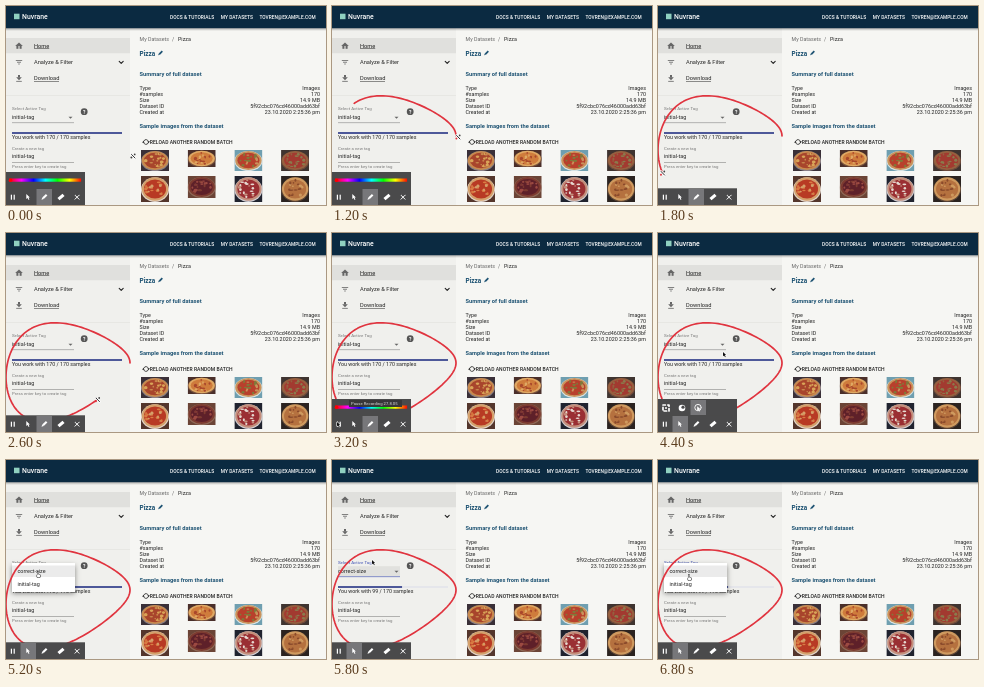
Recreate the animation shown at these times as an HTML page with a canvas. Size 320 by 199 pixels, loop 7 s.

```html
<!DOCTYPE html>
<html lang="en">
<head>
<meta charset="utf-8">
<title>Dataset tags</title>
<style>
html, body { margin: 0; width: 100%; height: 100%; overflow: hidden; background: #f6f6f3; }
canvas { display: block; width: 320px; height: 199px; }
</style>
</head>
<body>
<canvas id="stage"></canvas>
<script>
const W = 320, H = 199, LOOP = 7000, STEP = 200;
const canvas = document.getElementById('stage');
const ctx = canvas.getContext('2d');
const ratio = window.devicePixelRatio || 1;
canvas.width = W * ratio;
canvas.height = H * ratio;

const NAVY = '#0b2a41', TEAL = '#1d5272', INK = '#222', GREY = '#777';
const BLUE = '#3f51b5', RED = '#e0343f', BAR = '#4a4a4b', LIT = '#77777a';

function rect(x, y, w, h, fill) {
  ctx.fillStyle = fill;
  ctx.fillRect(x, y, w, h);
}

// Large type scaled down keeps letter advances exact at small sizes.
function text(str, x, y, size, color = INK, weight = 400, align = 'left') {
  ctx.save();
  ctx.translate(x, y);
  ctx.scale(0.1, 0.1);
  ctx.font = `${weight} ${size * 10}px Roboto, sans-serif`;
  ctx.textAlign = align;
  ctx.fillStyle = color;
  ctx.fillText(str, 0, 0);
  ctx.restore();
}

function line(points, color, width = 1) {
  ctx.beginPath();
  points.forEach(([x, y]) => ctx.lineTo(x, y));
  ctx.strokeStyle = color;
  ctx.lineWidth = width;
  ctx.lineCap = ctx.lineJoin = 'round';
  ctx.stroke();
}

function oval(x, y, rx, ry, fill) {
  ctx.beginPath();
  ctx.ellipse(x, y, rx, ry, 0, 0, 7);
  ctx.fillStyle = fill;
  ctx.fill();
}

function ring(x, y, r, color, width = 1, from = 0, to = 2 * Math.PI) {
  ctx.beginPath();
  ctx.arc(x, y, r, from, to);
  ctx.strokeStyle = color;
  ctx.lineWidth = width;
  ctx.stroke();
}

// Isosceles triangle standing on its base; a negative height points down.
function triangle(x, y, w, h, fill) {
  ctx.beginPath();
  ctx.moveTo(x - w / 2, y);
  ctx.lineTo(x + w / 2, y);
  ctx.lineTo(x, y - h);
  ctx.fillStyle = fill;
  ctx.fill();
}

function rotated(x, y, angle, draw) {
  ctx.save();
  ctx.translate(x, y);
  ctx.rotate(angle);
  draw();
  ctx.restore();
}

function random(seed) {
  return () => (seed = (seed * 16807) % 2147483647) / 2147483647;
}

function pencil(x, y, color, size) {
  rotated(x, y, Math.PI / 4, () => {
    rect(-size / 6, -size / 2, size / 3, size * 0.8, color);
    triangle(0, size * 0.3, size / 3, -size / 3, color);
  });
}

function arrow(x, y, size, fill, outline) {
  rotated(x, y, 0, () => {
    ctx.beginPath();
    [[0, 0], [0, 1], [0.25, 0.8], [0.48, 1.2], [0.62, 1.1], [0.45, 0.72], [0.72, 0.7]]
      .forEach(([px, py]) => ctx.lineTo(px * size, py * size));
    ctx.closePath();
    ctx.lineWidth = 0.9;
    ctx.strokeStyle = outline || fill;
    if (outline) ctx.stroke();
    ctx.fillStyle = fill;
    ctx.fill();
  });
}

function header() {
  const shade = ctx.createLinearGradient(0, 22, 0, 25);
  shade.addColorStop(0, 'rgba(0,0,0,.3)');
  shade.addColorStop(1, 'rgba(0,0,0,0)');
  rect(0, 22, W, 3, shade);
  rect(0, 0, W, 22.2, NAVY);
  rect(8, 7.7, 5.5, 5.5, '#8fd0c0');
  text('Nuvrane', 16, 13.4, 6.9, '#fff', 500);
  text('DOCS & TUTORIALS', 164, 12.5, 4.9, '#fff', 500);
  text('MY DATASETS', 214.7, 12.5, 4.9, '#fff', 500);
  text('TOVREN@EXAMPLE.COM', 253.5, 12.5, 4.8, '#fff', 500);
}

function sidebar(tag, count, focused) {
  rect(0, 22, 124, H, '#f0f0ed');
  rect(0, 32, 124, 15.3, '#e0e0dd');
  rect(0, 89, 124, 0.5, '#dcdcd9');

  triangle(13, 40, 7.6, 3.6, '#666');
  rect(10.4, 40, 2, 2.8, '#666');
  rect(13.6, 40, 2, 2.8, '#666');
  [6.4, 4, 1.6].forEach((w, i) => rect(13 - w / 2, 54 + i * 1.8, w, 0.8, '#666'));
  rect(12, 69, 2, 2.4, '#666');
  triangle(13, 71.2, 5.6, -3, '#666');
  rect(10.2, 74.9, 5.6, 0.8, '#666');
  ['Home', 'Analyze & Filter', 'Download'].forEach((label, i) =>
    text(label, 28, 41.6 + i * 16.3, 5.7));
  rect(28, 42.5, 15.2, 0.5, INK);
  rect(28, 75, 25, 0.5, INK);
  line([[113.2, 55.4], [115.2, 57.4], [117.2, 55.4]], INK, 1.1);

  text('Select Active Tag', 6, 104, 4.4, focused ? BLUE : GREY);
  if (focused) rect(6, 106.2, 62, 10.4, '#e1e1de');
  text(tag, 6, 113, 5.4);
  triangle(64.5, 110.8, 4, -2, '#666');
  rect(6, 116.5, 62, 0.6, focused ? BLUE : '#888');
  oval(78.2, 105.7, 3.4, 3.4, '#555');
  text('?', 78.2, 107.5, 5, '#fff', 700, 'center');

  rect(6, 126.2, 110, 1.6, '#e3e4ec');
  rect(6, 126.2, 110 * count / 170, 1.6, '#283685');
  text(`You work with ${count} / 170 samples`, 6, 133, 5.3);
  text('Create a new tag', 6, 143.6, 4.3, GREY);
  text('initial-tag', 6, 152.4, 5.4);
  rect(6, 156.2, 62, 0.6, '#888');
  text('Press enter key to create tag', 6, 161.8, 4.3, GREY);
}

function pizza(x, y, w, h, seed, [back, plate, crust, sauce, topping]) {
  const rnd = random(seed * 7919);
  const cx = x + w / 2, cy = y + h / 2, rx = w * 0.47, ry = h * 0.45;
  ctx.save();
  ctx.beginPath();
  ctx.rect(x, y, w, h);
  ctx.clip();
  rect(x, y, w, h, back);
  oval(cx, cy + 0.6, rx + 0.9, ry + 0.6, plate);
  oval(cx, cy, rx, ry, crust);
  oval(cx, cy, rx * 0.84, ry * 0.82, sauce);
  for (let i = 0; i < 18; i++) {
    const a = rnd() * 6.28, d = Math.sqrt(rnd()) * 0.75;
    oval(cx + Math.cos(a) * d * rx, cy + Math.sin(a) * d * ry,
      0.7 + rnd() * 1.4, 0.6 + rnd(), i % 3 ? topping : crust);
  }
  ctx.restore();
}

// Backdrop, plate, crust, sauce and topping of each sample.
const SAMPLES = [
  ['#3a3038', '#8a7f86', '#c88a4e', '#a8452c', '#d9a458'],
  ['#4a2f2a', '#77503c', '#dfa964', '#cf7c3c', '#a9472b'],
  ['#6f9fb0', '#d5e2e4', '#c9935c', '#b8402c', '#7f7a3a'],
  ['#3f3430', '#6d4a3c', '#96603f', '#a23a30', '#8b7a4c'],
  ['#54362c', '#e2d6cb', '#d4a06b', '#b83a24', '#d97c44'],
  ['#6b4436', '#8f6a58', '#7d3b30', '#5e2029', '#9c4a42'],
  ['#20232f', '#cfcdd2', '#c48f7c', '#9a2f33', '#e6d8d0'],
  ['#2b2320', '#5b4436', '#cf9a5f', '#b5713f', '#8a4a2b']
];

function mainPanel() {
  rect(124, 22, 196, H, '#f6f6f3');
  text('My Datasets', 133.5, 34.6, 5.3, '#666');
  text('/', 166, 34.6, 5.3, '#666');
  text('Pizza', 172, 34.6, 5.3);
  text('Pizza', 133.5, 49.7, 6.4, TEAL, 700);
  pencil(154.5, 47, TEAL, 5.2);
  text('Summary of full dataset', 133.5, 70.2, 5.75, TEAL, 700);
  const facts = {
    'Type': 'Images', '#samples': '170', 'Size': '14.9 MB',
    'Dataset ID': '5f92cbc076cd46000add63bf', 'Created at': '23.10.2020 2:25:36 pm'
  };
  Object.entries(facts).forEach(([label, value], i) => {
    const y = 83.8 + i * 6.15;
    text(label, 133.5, y, 5.35);
    text(value, 314, y, 5.4, INK, 400, 'right');
  });
  text('Sample images from the dataset', 133.5, 122, 5.75, TEAL, 700);

  ring(140, 136, 2.4, INK, 0.8, 0.3, 2.8);
  ring(140, 136, 2.4, INK, 0.8, 3.5, 5.9);
  triangle(137.4, 136.8, 2.4, 2, INK);
  triangle(142.6, 135.2, 2.4, -2, INK);
  text('RELOAD ANOTHER RANDOM BATCH', 143.8, 137.8, 5.05, INK, 500);

  SAMPLES.forEach((tones, i) => {
    const col = i % 4, row = i >> 2;
    const h = 21 + row * 5 - (col === 1 ? 4 : 0);
    pizza(135 + col * 46.7, 144 + row * 26, 28, h, i + 3, tones);
  });
}

function menu() {
  ctx.save();
  ctx.shadowColor = 'rgba(0,0,0,.45)';
  ctx.shadowBlur = 5 * ratio;
  ctx.shadowOffsetY = 1.5 * ratio;
  rect(6, 103, 63, 29, '#fff');
  ctx.restore();
  rect(6, 105.5, 63, 11.5, '#ebebeb');
  text('correct-size', 11.5, 113.2, 5.4);
  text('initial-tag', 11.5, 125.7, 5.4);
}

// Hand-drawn loop: a tilted ellipse, pointed at the right by its second harmonic.
function loopPoint(angle) {
  const c = Math.cos(angle), s = Math.sin(angle);
  return [62 + 62 * c, 137 - 7 * c - 46 * s + 18 * s * c];
}

const penAngle = t => Math.max(0, Math.min(2 * Math.PI, (t - 120) * 0.0021));

function ink(t) {
  const end = penAngle(t), points = [];
  for (let a = 0; a < end; a += 0.05) points.push(loopPoint(a));
  if (end > 0) line([...points, loopPoint(end)], RED, 1.7);
}

// Pointer stops after drawing: time, x, y.
const STOPS = [[3200, 5, 189], [3600, 22, 189], [4400, 65, 119], [5200, 32, 112],
  [5800, 40, 100], [6800, 31, 115]];

function pointer(t) {
  if (t < STEP) return [127, 150];
  if (t <= 1200) return [126, 131];
  if (t < STOPS[0][0]) return loopPoint(penAngle(t));
  const i = STOPS.findIndex(([time]) => time >= t);
  const [t1, x1, y1] = STOPS[i], [t0, x0, y0] = STOPS[Math.max(0, i - 1)];
  const u = t1 > t0 ? (t - t0) / (t1 - t0) : 1;
  return [x0 + (x1 - x0) * u, y0 + (y1 - y0) * u];
}

function cursor(t, menuOpen) {
  const [x, y] = pointer(t);
  if (t < STOPS[0][0]) {
    line([[x - 1.6, y - 1.7], [x + 2, y + 2]], '#fff', 2.4);
    line([[x - 1.6, y - 1.7], [x + 2, y + 2]], '#333');
    oval(x - 1.6, y + 1.6, 1, 1, t >= STEP ? RED : '#444');
    oval(x + 1.7, y - 1.6, 0.9, 0.9, '#444');
  } else if (menuOpen) {
    line([[x, y], [x, y + 4]], '#333', 1.8);
    oval(x + 0.6, y + 4, 2.3, 2, '#333');
    line([[x, y], [x, y + 4]], '#fff', 0.8);
    oval(x + 0.6, y + 4, 1.7, 1.4, '#fff');
  } else {
    arrow(x, y, 4.3, '#111', '#fff');
  }
}

function picker() {
  rect(0, 166, 79, 17, BAR);
  for (let x = 0; x < 72; x++) rect(3 + x, 172.5, 1.1, 3.2, `hsl(${360 - x * 5} 100% 50%)`);
  oval(4.5, 174.2, 1.8, 1.8, '#f00');
}

function spotlightRow() {
  rect(0, 166, 79, 17, BAR);
  rect(32.5, 167, 15.5, 15, LIT);
  ctx.setLineDash([2.4, 2.4]);
  ctx.strokeStyle = '#fff';
  ctx.strokeRect(5, 172, 6, 6);
  ctx.setLineDash([]);
  oval(8, 175, 1, 1, '#fff');
  oval(24, 175, 3.3, 3.3, '#fff');
  oval(25, 174.2, 1.6, 1.6, BAR);
  ring(40, 174.6, 3.2, '#fff', 0.9);
  arrow(39.2, 173.2, 4.5, '#fff');
}

function toolbar(t) {
  const usesPen = t < 3600;
  if (t < 1400 || (t >= 3000 && usesPen)) picker();
  if (!usesPen && t < 4800) spotlightRow();
  rect(0, 182.3, 79, 17, BAR);
  rect(usesPen ? 30.5 : 14.5, 183, 15.5, 16, LIT);
  rect(4.8, 188.7, 1.2, 5, '#fff');
  rect(7.6, 188.7, 1.2, 5, '#fff');
  arrow(20.3, 188, 5, '#fff');
  pencil(38.4, 191, '#fff', 6.4);
  rotated(55, 191, -0.7, () => rect(-3.3, -1.6, 6.6, 3.2, '#fff'));
  line([[69, 189.2], [73, 193.2]], '#fff');
  line([[73, 189.2], [69, 193.2]], '#fff');
  if (t >= 3000 && usesPen) {
    rect(17, 167, 53, 7, '#38383a');
    text('Pause Recording 27.8.05', 19, 172.1, 4.2, '#ddd');
  }
}

function render(t) {
  ctx.setTransform(ratio, 0, 0, ratio, 0, 0);
  const chosen = t >= 5400;
  const menuOpen = (t >= 5000 && !chosen) || t >= 6400;
  mainPanel();
  sidebar(chosen ? 'correct-size' : 'initial-tag', chosen ? 99 : 170, chosen);
  header();
  if (menuOpen) menu();
  ink(t);
  toolbar(t);
  cursor(t, menuOpen);
}

const start = performance.now();
function tick(now) {
  const elapsed = Math.max(0, now - start) % LOOP;
  render(Math.floor(elapsed / STEP) * STEP);
  requestAnimationFrame(tick);
}
render(0);
requestAnimationFrame(tick);
</script>
</body>
</html>
```
